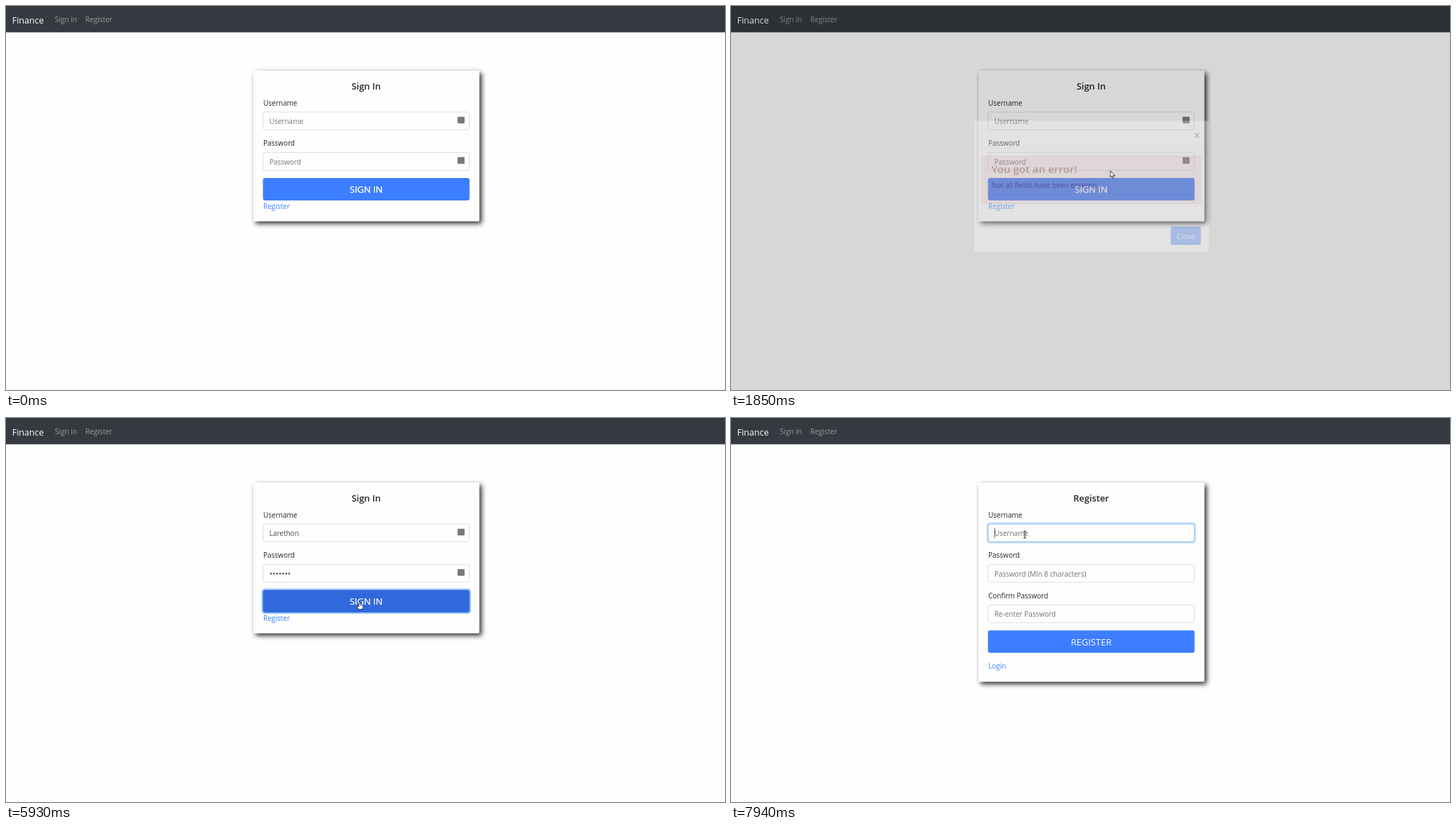
Animation, 1023 px wide and 547 px high, one loop 8 s. Source, as an HTML page:

```html
<!DOCTYPE html>
<html lang="en">
<head>
<meta charset="utf-8">
<title>Finance sign in</title>
<style>
html, body { margin: 0; width: 100%; height: 100%; overflow: hidden; background: #fefefe; }
svg { display: block; width: 100%; height: 100%; }
text { font: 10px "Open Sans", "Noto Sans", sans-serif; fill: #212529; white-space: pre; }
.brand { font-size: 12.6px; fill: #fff; }
.nav { font-size: 10.2px; fill: #9a9c9f; }
.title { font-size: 12.9px; font-weight: 600; }
.big { font-size: 13px; fill: #fff; }
.hint { fill: #6c757d; }
.typed { fill: #495057; }
.dots { font-size: 11.6px; fill: #495057; }
.link { fill: #3d82fa; }
.alert { font-size: 10.13px; fill: #721c24; }
.alert-head { font-size: 15.1px; font-weight: 600; fill: #721c24; }
.close { font-size: 10.4px; fill: #fff; }
.cross { font-size: 16px; font-weight: 700; fill: #7f7f7f; }
.mid { text-anchor: middle; }
</style>
</head>
<body>
<svg id="stage" viewBox="0 0 1023 547" xmlns="http://www.w3.org/2000/svg"></svg>
<script>
const LOOP = 8000;
const USER = "Larethon";

// ---- markup helpers ----
const text = (x, y, str, cls = "", id = "") =>
  `<text x="${x}" y="${y}" class="${cls}" id="${id}">${str}</text>`;
const rect = (x, y, w, h, attrs) =>
  `<rect x="${x}" y="${y}" width="${w}" height="${h}" ${attrs}/>`;
const ring = (id, y, h, color) =>
  rect(364.7, y - 1.1, 295.8, h + 2.2, `id="${id}Ring" rx="3.6" fill="none" stroke="${color}" stroke-width="2.2"`);
const field = (id, row, label, hint) => {
  const y = 151 + row * 57.7;
  return text(366, y - 9.5, label) +
    rect(365.9, y, 293.4, 25.3, 'rx="2.7" fill="#fefefe" stroke="#ced4da" stroke-width=".8"') +
    `<g id="${id}Ring" opacity="0">` +
    ring(id + "Glow", y, 25.3, "#bfdeff") +
    rect(365.9, y, 293.4, 25.3, 'rx="2.7" fill="none" stroke="#80bdff" stroke-width=".8"') + "</g>" +
    text(374.7, y + 17, hint, "hint", id + "Hint") +
    rect(374.7, y + 5.7, .8, 14, `id="${id}Caret" fill="#333" visibility="hidden"`);
};
const icon = (id, y) => rect(642.5, y, 10, 9.6, `id="${id}Icon" rx="1.2"`);
const card = (h, title) =>
  rect(352, 92, 321.3, h, 'rx="1.5" fill="#fefefe" filter="url(#shadow)"') +
  text(512.5, 118.5, title, "title mid");
const button = (id, y, label) =>
  rect(365.6, y, 294, 32, `id="${id}" rx="3.2" fill="#3d7dff"`) +
  text(512.5, y + 21.4, label, "big mid");

const $ = id => document.getElementById(id);
$("stage").innerHTML = `
<defs><filter id="shadow" x="-10%" y="-10%" width="120%" height="125%">
  <feDropShadow dx="3.3" dy="3.3" stdDeviation="3.6" flood-color="#000" flood-opacity=".85"/>
</filter></defs>
${rect(0, 0, 1023, 547, 'fill="#fefefe"')}
${rect(0, 0, 1023, 37.5, 'fill="#343a40"')}
${text(8.7, 24.6, "Finance", "brand")}
${text(69.5, 23.3, "Sign in", "nav")}
${text(112.7, 23.3, "Register", "nav")}
<g id="login">
  ${card(214.5, "Sign In")}
  ${field("user", 0, "Username", "Username")}
  ${text(374.7, 168, "", "typed", "userText")}
  ${icon("user", 157.7)}
  ${field("pass", 1, "Password", "Password")}
  ${text(374.7, 226.3, "", "dots", "passText")}
  ${icon("pass", 215.2)}
  ${ring("sign", 244.9, 32, "#9ec6ff")}
  ${button("sign", 244.9, "SIGN IN")}
  ${rect(365.6, 244.9, 294, 32, 'id="signHover" rx="3.2" fill="#00144c" fill-opacity=".2"')}
  ${text(512.5, 266.3, "SIGN IN", "big mid")}
  ${text(366, 289.3, "Register", "link")}
</g>
<g id="register">
  ${card(283.5, "Register")}
  ${field("newUser", 0, "Username", "Username")}
  ${field("newPass", 1, "Password", "Password (Min 8 characters)")}
  ${field("confirm", 2, "Confirm Password", "Re-enter Password")}
  ${button("join", 302.4, "REGISTER")}
  ${text(366, 357, "Login", "link")}
</g>
${rect(0, 0, 1023, 547, 'id="shade"')}
<g id="modal">
  ${rect(346, 172, 334, 187, 'rx="3" fill="#fefefe"')}
  ${text(663, 198, "×", "cross mid")}
  <path d="M346 210.4H680M346 311.4H680" stroke="#dee2e6" stroke-width=".8"/>
  ${rect(356.8, 221.8, 311.6, 68.2, 'rx="2.7" fill="#f3d6d8" stroke="#eec5c9" stroke-width=".8"')}
  ${text(370.5, 246, "You got an error!", "alert-head")}
  ${text(370.5, 267.2, "", "alert", "message")}
  ${rect(625.7, 322.7, 42.8, 26, 'rx="2.7" fill="#3d7dff"')}
  ${text(647, 340, "Close", "close mid")}
</g>
<g id="cursor" stroke-linejoin="round" stroke-width=".7" stroke="#000" fill="#fff">
  <path id="arrow" d="M0 0V9.2L2.1 7.2L3.5 10.3L4.9 9.7L3.5 6.7H6.3Z"/>
  <path id="hand" d="M-1 .4Q0-.9 1 .4V4L4.2 4.8Q5.4 5.2 5.2 6.6L4.3 10.6H-1.2L-3.6 6.8Q-3.6 5.4-2.2 5.9L-1 6.9Z"/>
  <path id="beam" d="M-2-4.8H2M0-4.8V4.8M-2 4.8H2" fill="none" stroke="#222" stroke-width=".9"/>
</g>`;

// ---- timing ----
const MODALS = [
  { open: 882, close: 1747, message: "Not all fields have been entered" },
  { open: 6282, close: 6757, message: "Invalid Login" }
];
// Pointer moves: start, end, x, y
const MOVES = [
  [0, 70, 896, 515], [70, 430, 577, 274],
  [1530, 1850, 540, 235], [1850, 2330, 490, 167],
  [5220, 5700, 503, 262],
  [6400, 6860, 432, 276], [6860, 7010, 386, 284],
  [7240, 7800, 418, 166]
];
const FOCUS = { user: 2330, pass: 3955, sign: 5640, newUser: 7790 };
const USER_START = 2960, USER_GAP = 140;
const PASS_START = 4610, PASS_GAP = 150, PASS_LENGTH = 7;
const PAGE_SWAP = 7240;

const clamp = v => Math.max(0, Math.min(1, v));
const ramp = (t, from, ms = 100) => clamp((t - from) / ms);
const pulse = (t, on, off, ms) => Math.min(ramp(t, on, ms), 1 - ramp(t, off, ms));
const easeOut = v => 1 - (1 - v) ** 1.67;
const within = (t, a, b) => t >= a && t < b;
const typedCount = (t, start, gap, max) =>
  Math.max(0, Math.min(max, Math.floor((t - start) / gap) + 1));

const set = (id, name, value) => $(id).setAttribute(name, value);
const show = (id, on) => set(id, "visibility", on ? "visible" : "hidden");

function pointer(t) {
  let x = 896, y = 515;
  for (const [from, to, toX, toY] of MOVES) {
    const k = ramp(t, from, to - from);
    x += (toX - x) * k;
    y += (toY - y) * k;
  }
  return [x, y];
}

function pointerKind(x, y, registering, covered) {
  if (covered || x < 366 || x > 659) return "arrow";
  const hit = (a, b) => y >= a && y <= b;
  if (hit(151, 177) || hit(208, 234) || (registering && hit(266, 292))) return "beam";
  if (registering) return hit(302, 334) ? "hand" : "arrow";
  return hit(245, 277) || (hit(279, 292) && x < 405) ? "hand" : "arrow";
}

function fillText(id, str) {
  const el = $(id + "Text");
  if (el.textContent !== str) el.textContent = str;
  show(id + "Hint", !str);
  set(id + "Caret", "x", 374.7 + (str ? el.getComputedTextLength() : 0));
}

function drawForms(t, registering) {
  $("login").style.display = registering ? "none" : "";
  $("register").style.display = registering ? "" : "none";

  const rings = {
    user: pulse(t, FOCUS.user, FOCUS.pass),
    pass: pulse(t, FOCUS.pass, FOCUS.sign),
    newUser: ramp(t, FOCUS.newUser),
    // The button regains focus whenever a dialog has closed
    sign: Math.max(pulse(t, 780, MODALS[0].open), pulse(t, 1900, FOCUS.user),
      pulse(t, FOCUS.sign, MODALS[1].open), pulse(t, 6910, 7020))
  };
  for (const id in rings) set(id + "Ring", "opacity", rings[id]);
  for (const id of ["user", "pass"]) set(id + "Icon", "fill", rings[id] > .5 ? "#000" : "#777");
  set("signHover", "opacity", Math.max(pulse(t, 330, MODALS[0].open), pulse(t, 5590, MODALS[1].open)));

  fillText("user", USER.slice(0, typedCount(t, USER_START, USER_GAP, USER.length)));
  fillText("pass", "•".repeat(typedCount(t, PASS_START, PASS_GAP, PASS_LENGTH)));
  show("userCaret", within(t, 2390, 2780) || within(t, USER_START, FOCUS.pass));
  show("passCaret", within(t, FOCUS.pass, 4520) || within(t, PASS_START, FOCUS.sign));
  show("newUserCaret", t >= FOCUS.newUser);
}

function drawModal(t) {
  const { open, close, message } = MODALS[t < 4000 ? 0 : 1];
  const fade = pulse(t, open, close, 150);
  const slide = easeOut(ramp(t, open, 300)) - easeOut(ramp(t, close, 300));
  $("message").textContent = message;
  set("shade", "opacity", fade / 2);
  set("modal", "opacity", fade);
  set("modal", "transform", `translate(0 ${8.5 - 33.3 * (1 - slide)})`);
  return fade > 0;
}

function render(t) {
  const registering = t >= PAGE_SWAP;
  drawForms(t, registering);
  const covered = drawModal(t);
  const [x, y] = pointer(t);
  const kind = pointerKind(x, y, registering, covered);
  set("cursor", "transform", `translate(${x} ${y})`);
  for (const k of ["arrow", "hand", "beam"]) show(k, t >= 70 && k === kind);
}

const start = performance.now();
function tick() {
  render((performance.now() - start) % LOOP);
  requestAnimationFrame(tick);
}
tick();
</script>
</body>
</html>
```
